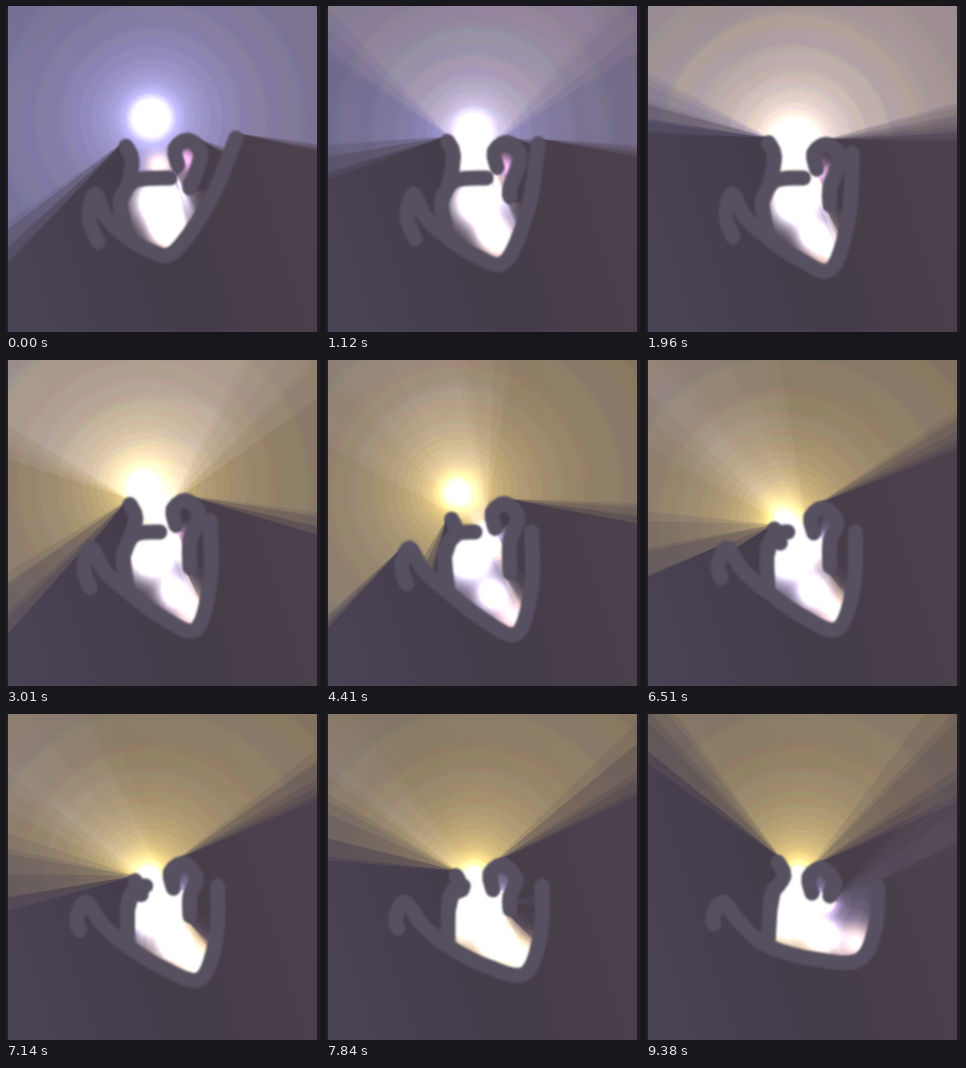
Recreate the animation shown at these times as an HTML page with a canvas. Size 314 by 326 pixels, loop 9.45 s.

```html
<!DOCTYPE html>
<html lang="en">
<head>
<meta charset="utf-8">
<title>Lamps in a drifting rope</title>
<style>
html, body { margin: 0; width: 100%; height: 100%; overflow: hidden; background: #454050; }
canvas { display: block; }
</style>
</head>
<body>
<canvas id="stage" width="314" height="326"></canvas>
<script>
const W = 314, H = 326, LOOP = 9450, STEP = 70;
const ROPE_WIDTH = 15, BLOCK_RADIUS = 5, SPACING = 6, LAMP_RADIUS = 4;
const ctx = document.getElementById('stage').getContext('2d');
const layer = document.createElement('canvas');
layer.width = W;
layer.height = H;
const lit = layer.getContext('2d');

const { sin, cos, PI, min, max, hypot } = Math;
const mix = (a, b, u) => a + (b - a) * u;
const mixPoint = (a, b, u) => [mix(a[0], b[0], u), mix(a[1], b[1], u)];
const clamp = v => max(0, min(1, v));
const smooth = v => (v = clamp(v), v * v * (3 - 2 * v));

// Samples a Catmull-Rom curve through the points at roughly even spacing.
function curve(points) {
  const at = i => points[max(0, min(points.length - 1, i))];
  const samples = [];
  for (let i = 0; i < points.length - 1; i++) {
    const [a, b, c, d] = [at(i - 1), at(i), at(i + 1), at(i + 2)];
    const count = Math.ceil(hypot(c[0] - b[0], c[1] - b[1]) / SPACING);
    for (let k = 0; k < count; k++) {
      const s = k / count;
      samples.push([0, 1].map(j => b[j] + .5 * s * (c[j] - a[j] +
        s * (2 * a[j] - 5 * b[j] + 4 * c[j] - d[j] + s * (3 * (b[j] - c[j]) + d[j] - a[j])))));
    }
  }
  return [...samples, at(points.length - 1)];
}

const tipAt = u => [168 + 45 * u + 8 * sin(2 * PI * u), 246 + 28 * sin(PI * u)];

function ropesAt(u) {
  const tip = tipAt(u);
  const arm = [199 + 31 * (1 - sin(PI * u)) ** 2 * (1 - .4 * u) + 14 * u, mix(132, 172, smooth(u * 2))];
  const side = mixPoint(tip, arm, .45);
  const base = [122, 232];
  const belly = mixPoint(base, tip, .5);
  const lip = [120 + 12 * u, 149 + 15 * sin(2 * PI * (u - .4)) + 8 * u];
  const wall = [114 + 10 * u, 196];
  const [archX, archY] = [182 - 6 * u, 134 + 20 * u];
  return [
    [[92 - 24 * u, 236 - 26 * u], [83 - 16 * u, 212 - 10 * u], [89 - 12 * u, 188],
      [100 - 4 * u, 211], base, [belly[0], belly[1] + 6], tip, [side[0] + 8, side[1]], arm],
    [lip, [lip[0] + 6, lip[1] + 14], [122 + 4 * u, 180], wall, base],
    [wall, [128, 175], [mix(164, 132, u), 172]],
    [[archX - 10, archY + 25], [archX - 13, archY + 9], [archX, archY],
      [archX + 13, archY + 14], [184, 182], [184, 178 + 35 * sin(PI * u)]]
  ].map(curve);
}

// Sky lamps fade with the root of the distance and have a white core.
const skyLamp = (pos, rgb, power, core) => ({
  pos, rgb, range: 420, samples: 7,
  strength: r => power * 900 / Math.sqrt(r + 1),
  white: r => 230 * Math.exp(-((r / core) ** 2))
});
const caveLamp = (pos, rgb, power, reach) => ({
  pos, rgb, range: reach * 2.6, samples: 3,
  strength: r => power * Math.exp(-((r / reach) ** 2)),
  white: () => 0
});

function lampsAt(u) {
  const tip = tipAt(u);
  const pink = [170 + 9 * cos(2 * PI * u), 154 + 34 * sin(PI / 2 * u)];
  const sink = clamp(u / .45);
  const violet = [mix(145, pink[0], sink * sink), mix(112, pink[1], sink)];
  const yellow = [142 + 11 * cos(2 * PI * u), 162 - 37 * sin(PI * min(1, u / .72)) ** 2];
  const pool = [154 - 12 * smooth(u * 2), 195];
  return [
    skyLamp(violet, [.67, .68, 1], mix(1, .3, clamp(u * 2.2)), mix(15, 6, sink)),
    skyLamp(yellow, [.92, .81, .33], smooth(u / .3), mix(14, 8, clamp(u * 1.5))),
    caveLamp([153, 160], [1, .75, .35], 170 * (1 - smooth(u * 5)), 12),
    caveLamp(pink, [.9, .62, .88], 230, 11),
    caveLamp(pool, [1, .97, 1], 450, 22),
    caveLamp(mixPoint(pool, tip, .5), [1, .95, 1], 300, 15),
    caveLamp([tip[0] - 3, tip[1] - 17], [1, .84, .72], 210, 18)
  ];
}

// Cuts the shadow that each rope sample casts away from the light point.
function castShadows(x, y, range, samples) {
  lit.globalCompositeOperation = 'destination-out';
  lit.beginPath();
  for (const [px, py] of samples) {
    const dx = px - x, dy = py - y, distance = hypot(dx, dy);
    if (distance < BLOCK_RADIUS || distance > range) continue;
    const nx = -dy / distance * BLOCK_RADIUS, ny = dx / distance * BLOCK_RADIUS;
    const far = range * 2 / distance;
    lit.moveTo(px + nx, py + ny);
    lit.lineTo(px - nx, py - ny);
    lit.lineTo(x + (dx - nx) * far, y + (dy - ny) * far);
    lit.lineTo(x + (dx + nx) * far, y + (dy + ny) * far);
    lit.closePath();
  }
  lit.fill();
}

function shine({ pos: [x, y], rgb, range, samples: count, strength, white }, samples) {
  const light = lit.createRadialGradient(x, y, 0, x, y, range);
  for (let i = 0; i <= 24; i++) {
    const s = (i / 24) ** 2, r = s * range;
    const channels = rgb.map(c => Math.round(min(255, c * strength(r) + white(r))));
    light.addColorStop(s, `rgb(${channels})`);
  }
  ctx.globalCompositeOperation = 'lighter';
  ctx.globalAlpha = 1 / count;
  for (let i = 0; i < count; i++) {
    const angle = 2 * PI * i / count;
    lit.globalCompositeOperation = 'source-over';
    lit.clearRect(0, 0, W, H);
    lit.fillStyle = light;
    lit.beginPath();
    lit.arc(x, y, range, 0, 2 * PI);
    lit.fill();
    castShadows(x + LAMP_RADIUS * cos(angle), y + LAMP_RADIUS * sin(angle), range, samples);
    ctx.drawImage(layer, 0, 0);
  }
  ctx.globalCompositeOperation = 'source-over';
  ctx.globalAlpha = 1;
}

function paintShade() {
  const shade = ctx.createLinearGradient(0, H, W, H * .7);
  shade.addColorStop(0, '#4a4355');
  shade.addColorStop(.55, '#443c49');
  shade.addColorStop(1, '#4b414c');
  ctx.fillStyle = shade;
  ctx.fillRect(0, 0, W, H);
}

function paintRopes(ropes) {
  ctx.save();
  ctx.filter = 'blur(1px)';
  ctx.lineCap = ctx.lineJoin = 'round';
  ctx.lineWidth = ROPE_WIDTH;
  ctx.strokeStyle = '#575060';
  ctx.beginPath();
  for (const rope of ropes) {
    ctx.moveTo(...rope[0]);
    rope.forEach(point => ctx.lineTo(...point));
  }
  ctx.stroke();
  ctx.restore();
}

function render(t) {
  const u = t / (LOOP - STEP);
  const ropes = ropesAt(u);
  paintShade();
  for (const lamp of lampsAt(u)) {
    if (lamp.strength(1) > 1) shine(lamp, ropes.flat());
  }
  paintRopes(ropes);
  ctx.fillStyle = '#211f24';
  ctx.fillRect(0, 0, 2, H);
  ctx.fillRect(311, 0, 3, H);
}

let shown = -1;
function tick() {
  const t = Math.floor(performance.now() % LOOP / STEP) * STEP;
  if (t !== shown) render(shown = t);
  requestAnimationFrame(tick);
}
tick();
</script>
</body>
</html>
```
